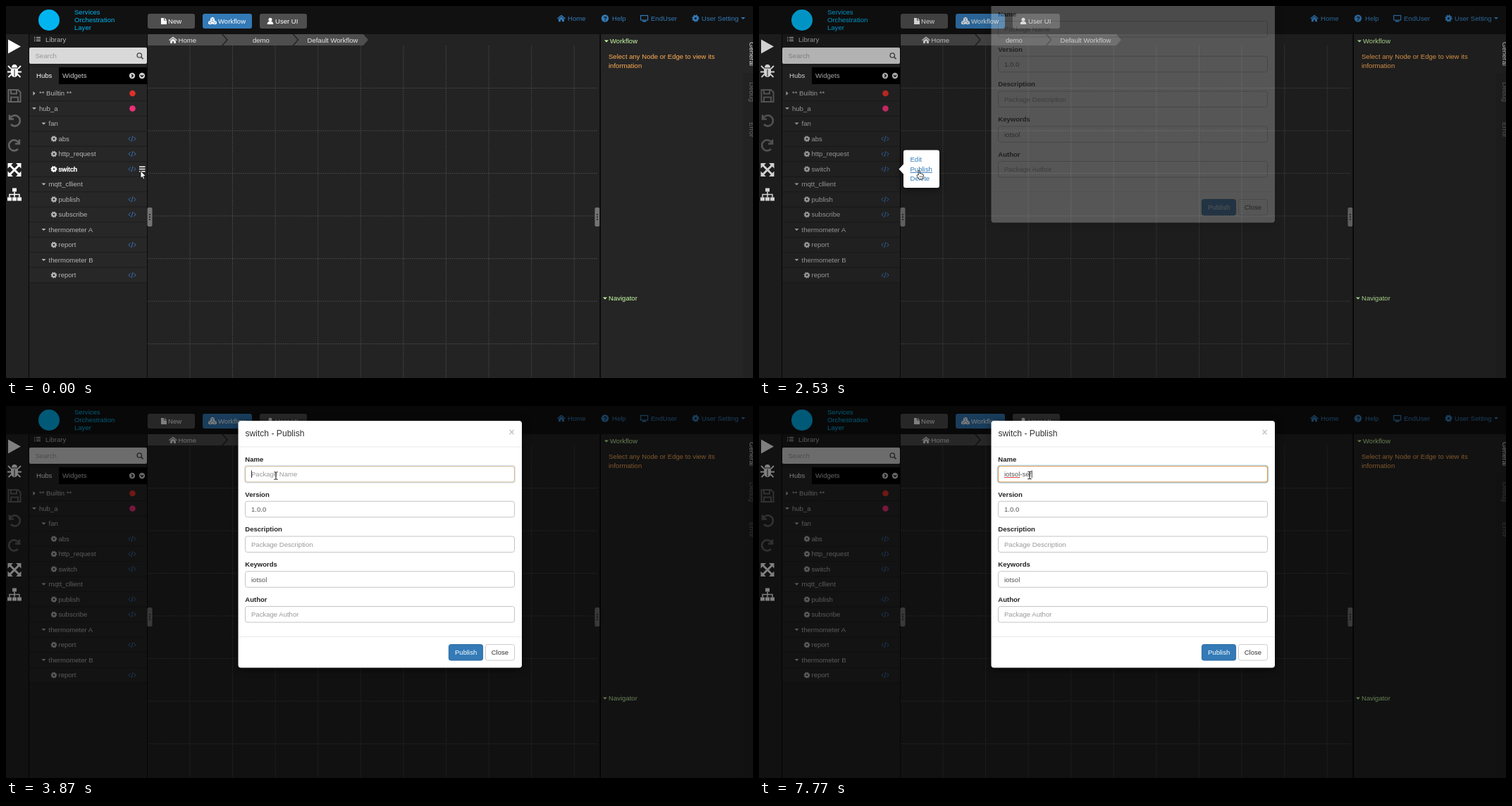
An HTML page that plays this animation: 1060 by 528 pixels, repeating every 8 s.

```html
<!DOCTYPE html>
<html>
<head>
<meta charset="utf-8">
<title>Workflow editor</title>
<style>
html, body { margin: 0; width: 100%; height: 100%; overflow: hidden; background: #111; }
svg { display: block; width: 1060px; height: 528px; font: 9.55px "Liberation Sans", Arial, sans-serif; }
text { white-space: pre; }
</style>
</head>
<body>
<svg id="stage" viewBox="0 0 1060 528"></svg>
<script>
const LOOP = 8000;
const BLUE = '#337ab7', GREY = '#b5b5b5', GREEN = '#ccffa8';
const $ = id => document.getElementById(id);

// Drawing helpers; text is placed by the vertical centre of its capitals.
const text = (x, y, s, fill, more = '') => `<text x="${x}" y="${y + 3.4}" fill="${fill}" ${more}>${s}</text>`;
const rect = (x, y, w, h, fill, more = '') => `<rect x="${x}" y="${y}" width="${w}" height="${h}" fill="${fill}" ${more}/>`;
const circle = (x, y, r, fill, more = '') => `<circle cx="${x}" cy="${y}" r="${r}" fill="${fill}" ${more}/>`;
const path = (d, fill, more = '') => `<path d="${d}" fill="${fill}" ${more}/>`;
const line = (d, colour, w = 1, more = '') => path(d, 'none', `stroke="${colour}" stroke-width="${w}" ${more}`);
const group = (x, y, body) => `<g transform="translate(${x} ${y})">${body}</g>`;

const cog = (x, y, r, c) => circle(x, y, r * .55, 'none', `stroke="${c}" stroke-width="${r * .5}"`) +
  circle(x, y, r * .85, 'none', `stroke="${c}" stroke-width="${r * .3}" stroke-dasharray="${r * .85 * Math.PI / 8}"`);
const home = (x, y, c) => group(x, y, line('M-5.5 .5L0 -4L5.5 .5', c, 1.4) + path('M-4 1L0 -2.4L4 1V4.8H1V2H-1V4.8H-4Z', c));
const down = (x, y, c, r = 3) => path(`M${x - r} ${y - r / 2}h${2 * r}l${-r} ${r}z`, c);
const code = (x, y) => line(`M${x - 2.5} ${y - 2.7}l-2.5 2.7l2.5 2.7M${x + 2.5} ${y - 2.7}l2.5 2.7l-2.5 2.7M${x + 1} ${y - 4}l-2 8`, '#3a78c4', .9);
const user = (x, y, c) => circle(x, y - 2.2, 2.5, c) + path(`M${x - 4.3} ${y + 4.5}q0-4.5 4.3-4.5t4.3 4.5z`, c);
const cube = (x, y) => path(`M${x} ${y - 3}l3 1.4v3.2l-3 1.4l-3-1.4v-3.2z`, '#fff') +
  line(`M${x - 2.7} ${y - 1.4}l2.7 1.2l2.7-1.2M${x} ${y}v2.8`, BLUE, .6);

function topBar() {
  const button = (x, w, fill, label, tx) => rect(x, 11, w, 21, fill, 'rx="3"') + text(tx, 21.5, label, '#fff');
  return rect(0, 0, 1060, 40, '#111') +
    circle(61, 20, 15, '#00b4f0') +
    ['Services', 'Orchestration', 'Layer'].map((s, i) => text(97, 8.5 + 11 * i, s, '#00b4f0')).join('') +
    button(201, 67, '#4e4e4e', 'New', 230) + path('M220 17h4v3.5h4V26h-8zM225 17l3 2.8h-3z', '#fff') +
    button(279, 70, BLUE, 'Workflow', 301) + cube(293, 18.8) + cube(290, 23.6) + cube(296, 23.6) +
    button(360, 67, '#4e4e4e', 'User UI', 382) + user(375, 21.5, '#fff') +
    home(788, 17.5, BLUE) + text(797, 17.5, 'Home', BLUE) +
    circle(850, 17.5, 5.2, BLUE) + text(847.5, 17.5, '?', '#111', 'font-weight="bold" font-size="9"') + text(860, 17.5, 'Help', BLUE) +
    rect(900.7, 13.5, 10, 6.5, 'none', `stroke="${BLUE}" stroke-width="1.2"`) + rect(903, 21, 5.5, 1.5, BLUE) + text(915, 17.5, 'EndUser', BLUE) +
    cog(978.5, 17.5, 5.2, BLUE) + text(987, 17.5, 'User Setting', BLUE) + down(1046, 17.5, BLUE);
}

function toolbar() {
  const dim = '#636363', W = '#fff';
  const turn = 'M-7 -8v6h6M-6.5 -2.5A7.5 7.5 0 1 1 -5 5.5';
  const box = (x, y) => rect(x, y, 6, 5, W);
  return rect(0, 40, 32, 488, '#222') + rect(32, 40, 1, 488, '#060606') +
    path('M3 47.5L21 57.5L3 67.5Z', W) +
    group(12, 92, path('M-5 -3.5h10v6q0 6.5-5 6.5t-5-6.5zM-4 -4.5q0-4.5 4-4.5t4 4.5z', W) +
      line('M-9 -7l4 4M9 -7l-4 4M-10 1.5h5M10 1.5h-5M-8.5 9l4-4M8.5 9l-4-4', W, 1.8) + line('M0 -2v10', '#222', 1)) +
    group(12, 127.5, line('M-8.5 -8.5H5L8.5 -5V8.5H-8.5ZM-5 -8v5H3v-5M-5 8V2H5V8', dim, 2)) +
    group(12, 162.5, line(turn, dim, 2.6)) +
    group(12, 197.5, `<g transform="scale(-1 1)">${line(turn, dim, 2.6)}</g>`) +
    group(12, 232.5, line('M-7 -7L7 7M7 -7L-7 7', W, 3) +
      path('M-9.5 -9.5h7.5l-7.5 7.5zM9.5 -9.5v7.5l-7.5-7.5zM-9.5 9.5v-7.5l7.5 7.5zM9.5 9.5h-7.5l7.5-7.5z', W)) +
    group(12, 267.5, box(-3, -9) + box(-10, 4) + box(-3, 4) + box(4, 4) + line('M0 -4V4M-7 4V0H7V4', W, 1.5));
}

const TREE = [[0, '** Builtin **', '#e0302a'], [0, 'hub_a', '#ee2f78'], [1, 'fan'], [2, 'abs'], [2, 'http_request'], [2, 'switch'],
  [1, 'mqtt_cllient'], [2, 'publish'], [2, 'subscribe'], [1, 'thermometer A'], [2, 'report'], [1, 'thermometer B'], [2, 'report']];

function library() {
  const rows = TREE.map(([level, name, dot], i) => {
    const y = 124 + 21.5 * i, x = [47, 60.5, 74.5][level];
    const mark = level == 2 ? cog(68, y, 4.4, GREY) + code(179, y)
      : i ? down(x - 7, y, GREY) : path('M38.5 121l3 3l-3 3z', GREY);
    return rect(33, y + 10.2, 167, 1, '#1c1c1c') + mark + text(x, y, name, GREY) + (dot ? circle(179.5, y, 4.3, dot) : '');
  }).join('');
  const badge = (x, d) => circle(x, 99, 4.2, '#ccc') + line(d, '#000', 1.3);
  return rect(33, 40, 167, 488, '#232323') + rect(33, 111, 167, 281, '#272727') + rect(200, 40, 1, 488, '#0a0a0a') +
    rect(33, 40, 167, 18, '#1c1c1c') + line('M40 44.5h1.5M40 47h1.5M40 49.5h1.5M43 44.5h6M43 47h6M43 49.5h6', '#ccc', 1.2) + text(56, 48, 'Library', GREY) +
    rect(33, 59, 167, 23, '#d9d9d9', 'rx="2"') + text(41.5, 71, 'Search', '#999') +
    circle(189.3, 70, 3.2, 'none', 'stroke="#444" stroke-width="1.3"') + line('M191.6 72.3l3 3', '#444', 1.6) +
    rect(33, 87, 42, 24, '#272727') + rect(75, 87, 125, 24, '#000') + text(43, 99, 'Hubs', '#fff') + text(80, 99, 'Widgets', '#ccc') +
    badge(179, 'M178.2 97l2 2l-2 2') + badge(193, 'M191 98.2l2 2l2-2') + rows;
}

function workspace() {
  let grid = '';
  for (let i = 0; i < 10; i++) grid += `M${260.9 + 60.6 * i} 56V528`;
  for (let i = 0; i < 7; i++) grid += `M201 ${116.5 + 60.5 * i}H840`;
  const crumb = (x, end) => path(`M${x} 40H${end - 7}L${end} 48L${end - 7} 56H${x}L${x + (x > 201 ? 7 : 0)} 48Z`, '#4e4e4e');
  const handle = x => rect(x, 286, 7, 27, '#737373', 'rx="2"') + [296, 299.5, 303].map(y => circle(x + 3.5, y, .9, '#111')).join('');
  return rect(201, 40, 642, 488, '#232323') + line(grid, '#5a5a5a', .8, 'stroke-dasharray="1.5 1.5"') +
    crumb(201, 313) + crumb(308, 413.5) + crumb(408.5, 514) +
    home(237, 48.3, '#e6e6e6') + text(244.5, 48.5, 'Home', '#e6e6e6') + text(350, 48.5, 'demo', '#e6e6e6') + text(427.5, 48.5, 'Default Workflow', '#e6e6e6') +
    handle(200.5) + handle(835.5);
}

function sidePanel() {
  const tab = (y, s, c) => `<text transform="translate(1054.5 ${y}) rotate(90)" fill="${c}">${s}</text>`;
  return rect(842.5, 40, 1.5, 488, '#050505') + rect(844, 40, 216, 488, '#252525') + rect(1046, 95, 14, 433, '#222') +
    down(852, 50, GREEN) + text(857, 50, 'Workflow', GREEN) +
    text(855, 71.5, 'Select any Node or Edge to view its', '#ffae55') + text(855, 85, 'information', '#ffae55') +
    down(850, 415, GREEN) + text(855, 415, 'Navigator', GREEN) +
    tab(51, 'General', '#ddd') + tab(108, 'Debug', '#666') + tab(165, 'Error', '#666');
}

const hoverRow = () => '<g id="hover">' + cog(68, 231.5, 4.4, '#fff') +
  text(74.5, 231.5, 'switch', '#fff', 'stroke="#fff" stroke-width=".35"') +
  line('M189 228.3h8.5M189 231.5h8.5M189 234.7h8.5', '#fff', 1.6) + '</g>';

const popover = () => '<g id="popover">' +
  path('M208 204.5H253q3 0 3 3V255q0 3-3 3H208q-3 0-3-3V238.5L198.5 231.5L205 224.5V207.5q0-3 3-3Z', '#fff', 'style="filter:drop-shadow(0 3px 4px rgba(0,0,0,.4))"') +
  text(214.5, 218, 'Edit', BLUE) + text(214.5, 231.5, 'Publish', BLUE, 'id="link"') + text(214.5, 245, 'Delete', BLUE) +
  rect(214.5, 226, 31, 11, 'none', 'id="ring" stroke="#6f9be0"') + '</g>';

function modal() {
  const field = ([label, value, colour], i) => {
    const y = 75.5 + 49.75 * i;
    return text(339.3, y, label, '#222', 'font-weight="bold"') +
      rect(339.5, y + 10, 382, 22.5, '#fff', 'rx="3" stroke="#c4c4c4"') + text(348, y + 21.5, value, colour, i ? '' : 'id="name"');
  };
  return '<g id="modal">' +
    rect(329.5, 21, 402.5, 350.5, '#fff', 'rx="4" style="filter:drop-shadow(0 3px 6px rgba(0,0,0,.5))"') +
    `<text x="339.5" y="43" font-size="12.1" fill="#333">switch - Publish</text>` +
    `<text x="713.6" y="41.5" font-size="14" font-weight="bold" fill="#c8c8c8">×</text>` +
    line('M330 58H732M330 327.5H732', '#e5e5e5', .8) +
    [['Name', '', '#555'], ['Version', '1.0.0', '#555'], ['Description', 'Package Description', '#999'],
      ['Keywords', 'iotsol', '#555'], ['Author', 'Package Author', '#999']].map(field).join('') +
    '<g id="focus">' + rect(338.6, 84.6, 383.8, 24.3, 'none', 'rx="3.5" stroke="#bcd9f2" stroke-width="2"') +
    rect(339.5, 85.5, 382, 22.5, 'none', 'rx="2.5" stroke="#e2a04a" stroke-width="1.2"') + '</g>' +
    line('M348 101.5h22.3', '#e03030', .9, 'id="spell"') + rect(348, 91.5, .9, 10.5, '#222', 'id="caret"') +
    rect(628.4, 338.5, 48.2, 22.5, BLUE, 'rx="3" stroke="#2e6da4"') + text(637, 350, 'Publish', '#fff') +
    rect(680.5, 338.5, 41, 22.5, '#fff', 'rx="3" stroke="#ccc"') + text(688.7, 350, 'Close', '#333') + '</g>';
}

const OUTLINE = 'stroke="#000" stroke-width=".8" stroke-linejoin="round"';
const CURSORS = {
  arrow: path('M0 0V10.5L2.4 8.3L4.1 12L5.8 11.2L4.2 7.7H7.6Z', '#fff', OUTLINE),
  hand: path('M2.6 7V1.2q0-1 .9-1t.9 1V4.6q1.6-.6 1.9.5q1.6-.5 1.8.6q1.6-.3 1.6 1.2V9.6L8.6 12.8H3.9L.6 8.4q-.8-1.5.5-1.9z', '#fff', OUTLINE) +
    line('M4.6 8v2.5M6.3 8v2.5M8 8v2.5', '#000', .5),
  beam: line('M-2.6 -5.2H-.9L0 -4.5L.9 -5.2H2.6M0 -4.5V4.5M-2.6 5.2H-.9L0 4.5L.9 5.2H2.6', '#111', 1)
};

$('stage').innerHTML = topBar() + toolbar() + library() + workspace() + sidePanel() + hoverRow() +
  rect(0, 0, 1060, 528, '#000', 'id="shade"') + modal() + popover() + '<g id="cursor"></g>';

// Each track holds [start time, value...] steps.
const POINTER = [[0, 191, 234, 'arrow'], [120, 190, 233, 'hand'], [1550, 197.5, 232.5, 'arrow'], [1710, 207, 233, 'arrow'],
  [1840, 218, 233, 'hand'], [1960, 223.6, 233, 'hand'], [2940, 275, 208, 'arrow'], [3070, 335.5, 164.5, 'arrow'],
  [3210, 355, 139, 'arrow'], [3330, 369, 118.5, 'arrow'], [3480, 379, 104, 'beam'], [3610, 383, 99, 'beam'], [4660, 384, 98.3, 'beam']];
const POPOVER = [[0, 0], [1050, .5], [1170, 1], [2940, .5], [3070, 0]];
const MODAL = [[0, 0, 0, 0], [2530, -64, .25, .18], [2670, -17.5, 1, .5], [2800, 0, 1, .5]];
const FOCUS = [[0, 0], [3870, .4], [3990, .75], [4110, 1]];
const TYPED = [[0, 0], [4660, 1], [5060, 2], [5310, 3], [5840, 4], [6000, 5], [6290, 6], [7220, 7], [7360, 8], [7620, 9], [7770, 10]];

const at = (track, t) => track.findLast(step => step[0] <= t).slice(1);
const set = (id, key, value) => $(id).setAttribute(key, value);
const show = (id, on) => set(id, 'opacity', +on);

function draw(t) {
  const [px, py, kind] = at(POINTER, t);
  $('cursor').innerHTML = CURSORS[kind];
  set('cursor', 'transform', `translate(${px} ${py})`);

  show('hover', t < 1710);
  show('popover', at(POPOVER, t)[0]);
  set('link', 'text-decoration', t >= 1840 && t < 2940 ? 'underline' : 'none');
  show('ring', t >= 2380 && t < 2530);

  const [dy, alpha, shade] = at(MODAL, t);
  set('modal', 'transform', `translate(0 ${dy})`);
  show('modal', alpha);
  show('shade', shade);

  const typed = at(TYPED, t)[0], name = $('name');
  name.textContent = typed ? 'iotsol-ser'.slice(0, typed) : 'Package Name';
  set('name', 'fill', typed ? '#555' : '#999');
  set('caret', 'x', 348 + (typed ? name.getComputedTextLength() : 0));
  show('caret', t >= 3870 && !(t >= 6810 && t < 7220));
  show('focus', at(FOCUS, t)[0]);
  show('spell', t >= 7220);
}

function tick() {
  draw(performance.now() % LOOP);
  requestAnimationFrame(tick);
}
tick();
</script>
</body>
</html>
```
